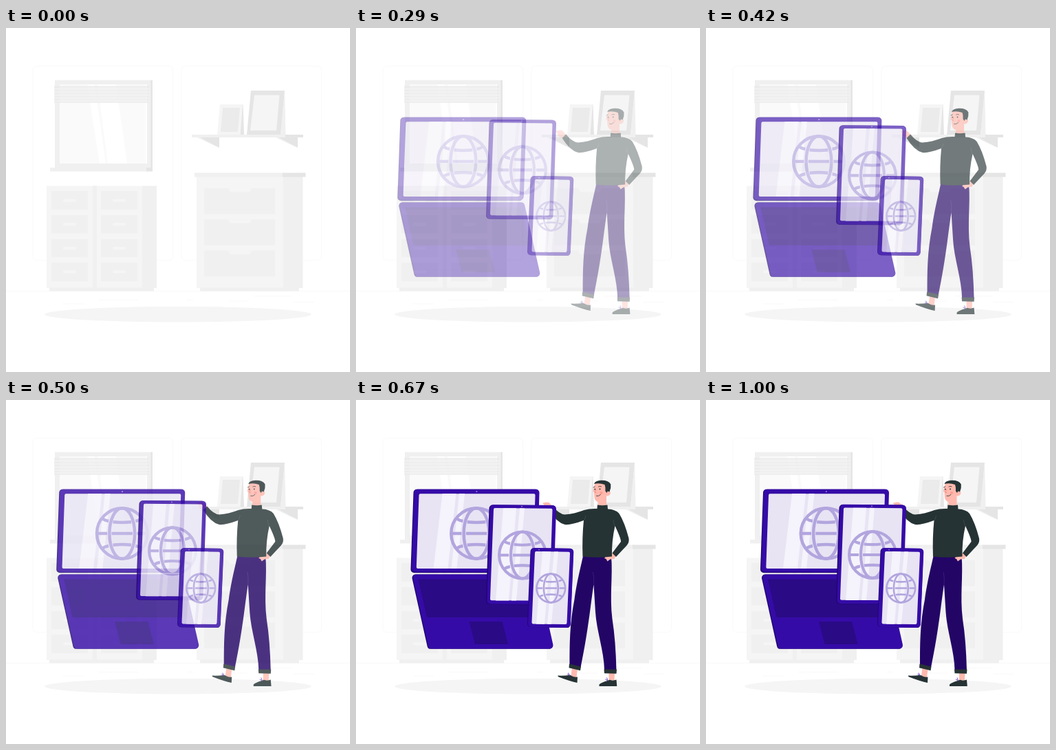
These frames come from a looping animation (500x500 px, 1040 ms). An HTML page:

```html
<!DOCTYPE html>
<html lang="en">
<head>
<meta charset="utf-8">
<title>Responsive devices</title>
<style>
  html, body { margin: 0; width: 100%; height: 100%; overflow: hidden; background: #fff; }
  svg { display: block; width: 100%; height: 100%; }
  .g1 { fill: #fafafa; } .g2 { fill: #f5f5f5; } .g3 { fill: #f0f0f0; }
  .g4 { fill: #ebebeb; } .g5 { fill: #e5e5e5; }
  .line { fill: none; stroke: #ebebeb; stroke-width: .3; }
  .round { stroke-width: 10; stroke-linejoin: round; }
  .edge { fill: #210674; stroke: #210674; }
  .face { fill: #350ba7; stroke: #350ba7; }
  .dark { fill: #2a0a85; }
  .screen { fill: #e8e4f4; stroke: #e8e4f4; stroke-width: 4; stroke-linejoin: round; }
  .shine { fill: #f5f3fb; }
  .cloth { fill: #263335; } .pants { fill: #230566; } .skin { fill: #ffb9ae; }
  .ink { fill: none; stroke: #263335; stroke-width: .8; stroke-linecap: round; }
</style>
</head>
<body>
<svg viewBox="0 0 500 500">
  <defs>
    <g id="globe" fill="none" stroke="#b2a5de" stroke-width="11.5">
      <circle r="94"/>
      <ellipse rx="47" ry="94"/>
      <path d="M-94 0H-55M-39 0H39M55 0H94"/>
      <path id="lat" d="M-76 -56Q-62 -48 -50 -46M-34 -43Q0 -39 34 -43M50 -46Q62 -48 76 -56"/>
      <use href="#lat" transform="scale(1 -1)"/>
    </g>
    <g id="handle"><rect x="-9.5" y="-2" width="19" height="4" rx="2" class="g2"/></g>
    <g id="drawers" class="g3">
      <path d="M0 0h53v26.5H0zM0 34.7h53v26.5H0zM0 69.4h53v26.5H0zM0 104h53v26.5H0z"/>
      <use href="#handle" x="26.5" y="13.5"/><use href="#handle" x="26.5" y="48"/>
      <use href="#handle" x="26.5" y="82.7"/><use href="#handle" x="26.5" y="117"/>
    </g>
    <g id="wide">
      <path class="g3" d="M288 233h103v37.500h-103z"/>
      <path class="g2" d="M323 233h34l-3 5.500h-28z"/>
    </g>
    <path id="bracket" class="g5" d="M0 0h32v15.500z"/>
  </defs>

  <!-- Room -->
  <rect class="line" x="39" y="55.300" width="203.500" height="282.200" rx="5.700"/>
  <rect class="line" x="255" y="55.300" width="203.500" height="282.200" rx="5.700"/>
  <path class="line" d="M0 382.400H500M134 395.300h58M361 389.600h54M418 398.500h30M263 395.500h9M324 397h27M83 401h30"/>
  <ellipse class="g2" cx="250" cy="416.200" rx="193.900" ry="11.300"/>

  <path class="g3" d="M71 75.700H211V208H71z"/>
  <path class="g5" d="M210.500 75.700H213V208h-2.500zM204 203h9v5.500h-9z"/>
  <path class="g3" d="M64 203H204v5.500H64z"/>
  <path class="g1" d="M78 82H205V197H78z"/>
  <path fill="#fff" d="M118 82h11l16 115h-9zM133 82h27l16 115h-28zM203.500 82h1.500v115h-1.500z"/>
  <path class="g4" opacity=".75" d="M70 84H208V109H70z"/>
  <path stroke="#f5f5f5" d="M70 88.500H208M70 93H208M70 97.500H208M70 102H208M70 106H208"/>

  <path class="g2" d="M59 229.500H198V378H59z"/>
  <path class="g3" d="M198 229.500h21V378h-21zM63 377.500H215v5H63zM126 229.500h6V378h-6z"/>
  <use href="#drawers" x="66" y="237.300"/><use href="#drawers" x="138" y="237.300"/>

  <path class="g2" d="M277 216H403V378H277z"/>
  <path class="g3" d="M403 216h28.500V378H403zM282 377.500H426v5H282zM274 210.500H403v6H274z"/>
  <path class="g5" d="M402 210.500h33.500v6H402z"/>
  <use href="#wide"/><use href="#wide" y="45.300"/><use href="#wide" y="90.500"/>

  <use href="#bracket" x="278" y="158.500"/><use href="#bracket" x="392" y="158.500"/>
  <path class="g3" d="M270 155H432v4H270zM278 159l31.500 15-27-15zM392 159l31.500 15-27-15z"/>
  <path class="g5" d="M406 155h26v4h-26zM343 111h1.500l1.500 44h-6z"/>
  <path class="g2" d="M311 111h33l-3.500 44H307z"/>
  <path class="g4" d="M315 116h25l-3 35h-25z"/>
  <path class="g3" d="M405 91l1.500 64H399z"/>
  <path class="g5" d="M356 91h49l-6 64h-49z"/>
  <path class="g2" d="M361 97.500h36.500L393 149h-38z"/>

  <g id="laptop">
    <path class="round edge" d="M88 134.700H260L256 246.300H84z"/>
    <path class="round face" d="M89 134.700H261L257.500 245H85.500z"/>
    <path class="screen" d="M93 138.300H258L254.500 243H89.300z"/>
    <path class="shine" d="M125 136.300h20L133 245H112zM149.500 136.300h8L146 245h-8z"/>
    <circle cx="174.800" cy="133.200" r="1.100" fill="#8c75d0"/>
    <use href="#globe" transform="translate(174.500 194) scale(.391)"/>
    <path class="round edge" d="M86 258.500H258L280 356.800H108z"/>
    <path class="round face" d="M87.500 258.500H259L281 356.500H109.500z"/>
    <path class="dark" d="M90 260.500H258L272 316H104.500q-2 0-2.500-2zM164 322h48l8.500 33H172.500z"/>
  </g>

  <g id="man">
    <!-- Feet -->
    <path class="skin" d="M314.500 389l8 2-1.500 13-8-3zM368 396h8.500l-.5 13h-8z"/>
    <path class="cloth" d="M294 400.500q8 .5 18-.8l2 1.300q4 2.500 8.500 1.500L322 411q-10-2-27-8.500-1.500-1-1-2zM354 413.500q3-3 12-5.500l3-1.200q5 1.800 10-.3l.8 9.500H354z"/>
    <path d="M307.500 398.500l4 2M309 396.500l2 4M363 406l4 2M365 403.500l1.500 4" stroke="#6d4fc4"/>
    <!-- Legs -->
    <path class="pants" d="M330.500 227H371.500C374 255 369 285 373 318Q378 350 379 393L361.500 392.500C361 365 350 335 348.500 308L346 268C341 300 339 330 327 389L311 385C311 355 311 325 318 290 322 262 326 248 330.500 227z"/>
    <path d="M346 268Q347 258 345 250" fill="none" stroke="#472a8c" stroke-width=".6"/>
    <path class="cloth" d="M310.500 383.500l17 4-1 5.800-16.500-4zM361 391.500h18.500l-.5 6.300-17.500-.5z"/>
    <!-- Hands, neck -->
    <path class="skin" d="M288 156C284 152 281 148.500 279 148.500L272.500 149.500Q271 151 273.500 151.500L275 157 283 161zM379 224C374 222 369 222.500 365 225L361.500 230 364 231 366 234.500 370 231.500 376 231z"/>
    <path class="skin" d="M352.500 140h12v15h-12z"/>
    <!-- Sweater -->
    <path class="cloth" d="M351.500 152.500q7 1.500 14.500 0l.5 6Q378 159 383 165 391 178 397 201 398 207 394 211.500L378.500 228 373 222.500 385.500 206Q386 202 377 183 372 205 372.500 227.500 350 230 330 227.500 329 200 331.500 175 313 182 304 181 292 178 281 160L286.500 154.500Q296 166 304 166.500 318 165.500 332 160 340 157.500 351 158z"/>
    <path d="M331.500 175Q334 172 334.500 168M376.500 183Q374.500 178 374.500 174" fill="none" stroke="#4b585a" stroke-width=".6"/>
    <!-- Head -->
    <path class="skin" d="M347.500 122Q356 117 366 122L366.500 132Q370.500 131.500 370.500 135.500 369 140 364.500 139.500 361 148.500 354 148.500 347.500 148 346.800 140L346.500 134.500 344.800 132.500 346 128z"/>
    <path class="cloth" d="M346.500 122Q348 117 357 116.700 368 116.500 370.800 122.500 371.500 128 369 133.500L366.300 132.500 365 135 363 132.500Q363.500 127 362 123 354 120 346.500 122z"/>
    <path class="ink" d="M345.500 127l2.200-1M353 126q2-1.300 4-.2M350 139.500q3.500 1 6-2"/>
    <path d="M349.500 130q-2 3.500-1.500 4.500l2 .3" fill="none" stroke="#e5847c" stroke-width=".8"/>
    <circle class="cloth" cx="347.800" cy="129.700" r=".9"/>
    <circle class="cloth" cx="355" cy="129.500" r=".9"/>
    <circle cx="357" cy="135" r="2" fill="#ff9a91"/>
  </g>

  <g id="tablet">
    <path class="round edge" d="M198.500 157L285 157.500 281 292 194 291.500z"/>
    <path class="round face" d="M200 156.800L286 157.500 281.500 291.500 195.500 291z"/>
    <path class="screen" d="M202 158.500L283.500 159.200 279 289.300 197 288.800z"/>
    <path class="shine" d="M214 156.700l19 .1L222 291H203zM238 156.800l7 .1L233 291h-7z"/>
    <circle cx="241" cy="154.200" r="1" fill="#8c75d0"/>
    <use href="#globe" transform="translate(242 225) scale(.361)"/>
  </g>

  <g id="phone">
    <path class="round edge" d="M258.500 220.200L311 221 306.500 326 254 325.200z"/>
    <path class="round face" d="M259.500 220L311.300 220.800 306.800 326 255 325.200z"/>
    <path class="screen" d="M262 222L309 222.800 304.500 324 257.500 323.400z"/>
    <path class="shine" d="M271 220.300l12 .2L274 325.700l-12-.2zM288 220.500l6 .1-10 105.200-6-.1z"/>
    <circle cx="266" cy="217.700" r=".9" fill="#8c75d0"/>
    <use href="#globe" transform="translate(283.300 273.500) scale(.222)"/>
  </g>
</svg>
<script>
  const LOOP = 1040, FPS = 24, LEAD = .035, DISTANCE = 30;
  const starts = { laptop: [-1, 0], man: [1, 0], tablet: [0, -1], phone: [0, 0] };

  const bezier = (s, a, b) => 3 * (1 - s) ** 2 * s * a + 3 * (1 - s) * s * s * b + s ** 3;

  // cubic-bezier(.36, -.01, .5, 1.38), which overshoots near the end
  function ease(t) {
    let lo = 0, hi = 1;
    for (let i = 0; i < 30; i++) {
      const mid = (lo + hi) / 2;
      if (bezier(mid, .36, .5) < t) lo = mid; else hi = mid;
    }
    return bezier(hi, -.01, 1.38);
  }

  function draw(now) {
    const step = Math.floor((now % LOOP + 5) * FPS / 1000);
    const p = step < 2 ? 0 : ease(Math.min(1, step / FPS + LEAD));
    const rest = (1 - p) * DISTANCE;
    for (const [id, [dx, dy]] of Object.entries(starts)) {
      const part = document.getElementById(id);
      part.setAttribute("transform", `translate(${dx * rest} ${dy * rest})`);
      part.setAttribute("opacity", Math.min(1, Math.max(0, p)));
    }
  }

  const start = performance.now();
  function tick() {
    draw(performance.now() - start);
    requestAnimationFrame(tick);
  }
  tick();
</script>
</body>
</html>
```
